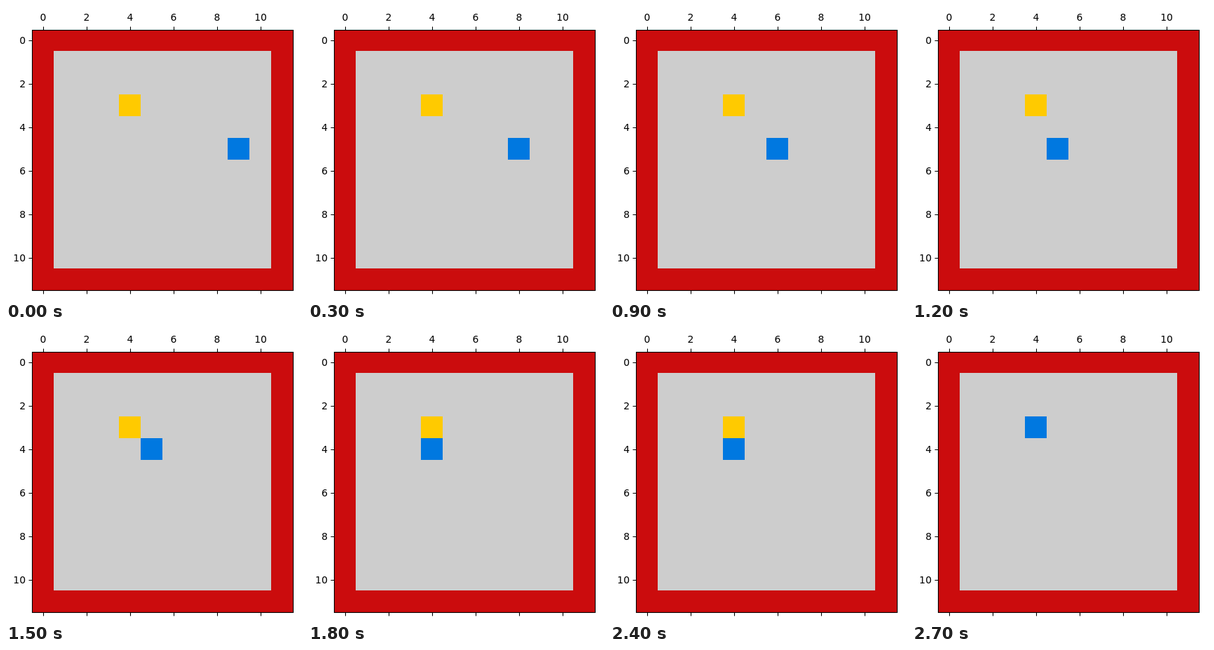
An HTML page that plays this animation: 422x419 px, repeating every 3 s.

```html
<!DOCTYPE html>
<html lang="en">
<head>
<meta charset="utf-8">
<title>Grid walk</title>
<style>
html, body { margin: 0; width: 100%; height: 100%; overflow: hidden; background: #fff; }
svg { display: block; }
text { font: 13.89px "DejaVu Sans", sans-serif; }
.top { text-anchor: middle; }
.left { text-anchor: end; }
#agent { animation: walk 3s step-end infinite; }
@keyframes walk {
  0% { transform: translate(279px, 155px); }
  10% { transform: translate(248px, 155px); }
  20% { transform: translate(217px, 155px); }
  30% { transform: translate(186px, 155px); }
  40% { transform: translate(155px, 155px); }
  50% { transform: translate(155px, 124px); }
  60% { transform: translate(124px, 124px); }
  70% { transform: translate(155px, 124px); }
  80% { transform: translate(124px, 124px); }
  90%, 100% { transform: translate(124px, 93px); }
}
</style>
</head>
<body>
<svg width="422" height="419" viewBox="0 0 422 419">
  <rect x="37" y="34" width="372" height="371" fill="#cb0c0d"/>
  <rect x="68" y="64" width="310" height="310" fill="#cdcdcd"/>
  <rect x="161" y="126" width="31" height="31" fill="#ffca00"/>
  <rect id="agent" x="37" y="33" width="31" height="31" fill="#0078e0"/>
  <rect x="37.5" y="34.5" width="372" height="371" fill="none" stroke="#000" stroke-width="1.1"/>
  <g id="axes"></g>
</svg>
<script>
const axes = document.getElementById("axes");

function add(tag, attrs, text = "") {
  const node = document.createElementNS("http://www.w3.org/2000/svg", tag);
  for (const key in attrs) node.setAttribute(key, attrs[key]);
  node.textContent = text;
  axes.append(node);
}

for (let n = 0; n <= 10; n += 2) {
  const x = 53 + 31 * n, y = 49 + 31 * n;
  const d = `M${x + 0.5} 29.5V34M${x + 0.5} 406V410.5M32.5 ${y + 0.5}H37`;
  add("path", { d, stroke: "#000", "stroke-width": 1.1 });
  add("text", { class: "top", x, y: 21 }, n);
  add("text", { class: "left", x: 28, y: y + 5 }, n);
}
</script>
</body>
</html>
```
